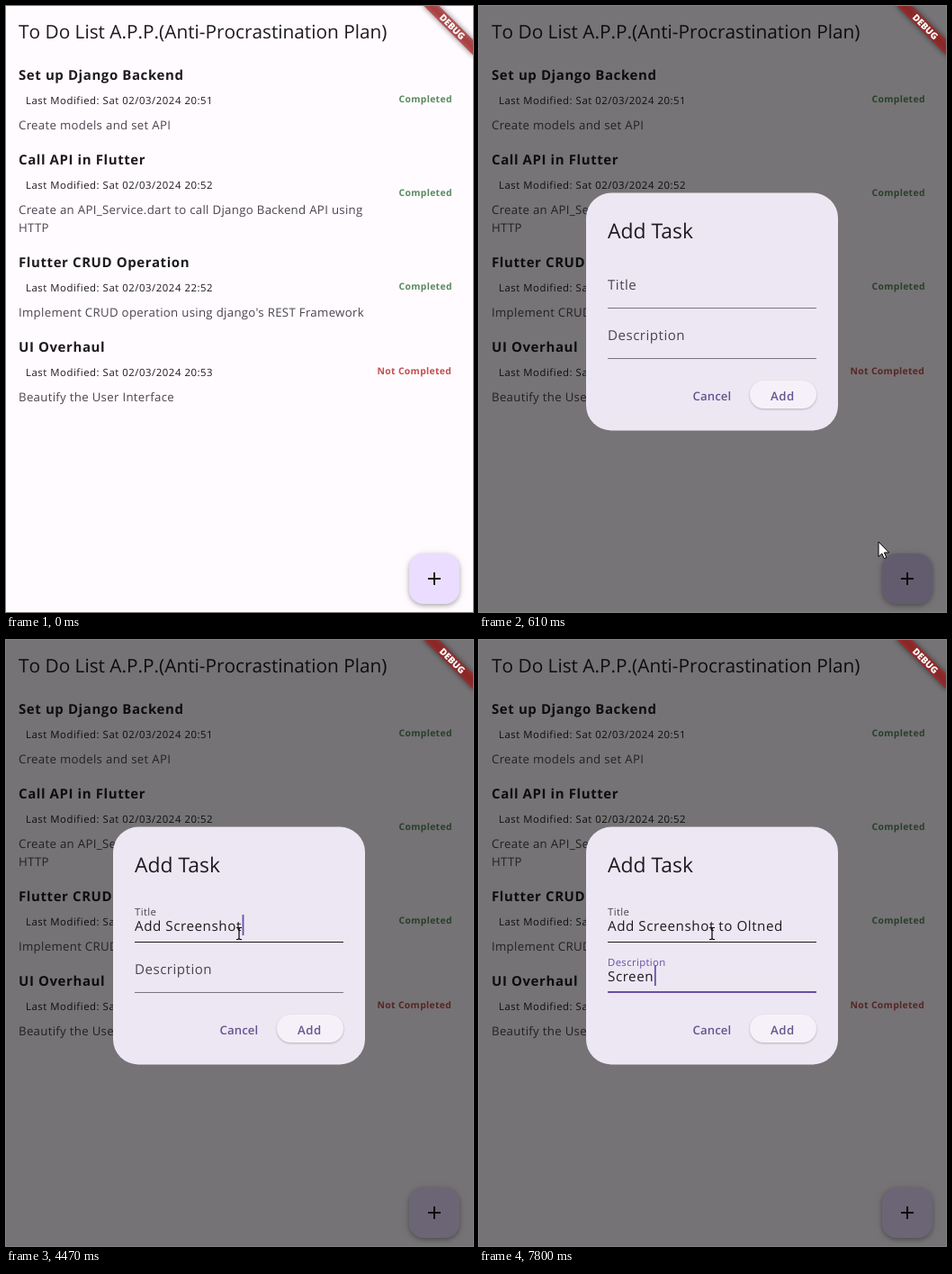
An HTML page for the animation above (8000 ms loop, 519 by 673 pixels).

```html
<!DOCTYPE html>
<html lang="en">
<head>
<meta charset="utf-8">
<title>To Do List</title>
<style>
  html, body { margin: 0; width: 100%; height: 100%; overflow: hidden; background: #fffbff; }
  svg { display: block; width: 519px; height: 673px; }
  text {
    font-family: "Open Sans", "Noto Sans", sans-serif;
    fill: #1d1b20;
    text-rendering: geometricPrecision;
    white-space: pre;
  }
  .head { font-size: 20.8px; font-kerning: none; }
  .name { font-size: 15px; font-weight: 700; letter-spacing: .59px; }
  .date { font-size: 11.34px; letter-spacing: .55px; }
  .body { font-size: 13.23px; letter-spacing: .31px; fill: #49454f; }
  .state { font-size: 10.4px; font-weight: 700; letter-spacing: .33px; fill: #588a5c; }
  .state.open { fill: #c0504f; }
  .dialog-title { font-size: 22.9px; }
  .label { font-size: 15.1px; letter-spacing: .5px; fill: #49454f; }
  .input { font-size: 15.2px; letter-spacing: .55px; }
  .button { font-size: 13.2px; font-weight: 600; letter-spacing: .1px; fill: #65558f; }
  .debug { font-size: 10.2px; font-weight: 800; fill: #fff; text-anchor: middle; }
  .fab { filter: drop-shadow(0 2px 2.5px rgba(0, 0, 0, .26)) drop-shadow(0 1px 4px rgba(0, 0, 0, .1)); }
  .pill { filter: drop-shadow(0 1px 1px rgba(0, 0, 0, .24)); }
  .soft { filter: blur(3px); }
</style>
</head>
<body>
<svg viewBox="0 0 519 673">
  <rect width="519" height="673" fill="#fffbff"/>
  <text class="head" x="14" y="36">To Do List A.P.P.(Anti-Procrastination Plan)</text>
  <g id="list"></g>

  <rect class="fab" x="448" y="608" width="56" height="56" rx="16" fill="#eaddff"/>
  <rect id="press" x="448" y="608" width="56" height="56" rx="16" fill="#21005d"/>
  <path d="M469 636h14M476 629v14" stroke="#1d1623" stroke-width="2"/>

  <rect id="barrier" width="519" height="673"/>

  <g id="dialog">
    <rect x="119" y="207.5" width="280" height="264" rx="28" fill="#ede7f3"/>
    <text class="dialog-title" x="143" y="258">Add Task</text>
    <g id="fields"></g>
    <text class="button" x="237.5" y="438">Cancel</text>
    <rect class="pill" x="301" y="416" width="74" height="31" rx="15.5" fill="#f6f1f9"/>
    <text class="button" x="324" y="438" style="letter-spacing:.5px">Add</text>
  </g>

  <g transform="translate(520 -1) rotate(45)">
    <rect class="soft" x="-40" y="28" width="80" height="12" fill="#000" opacity=".5"/>
    <rect x="-40" y="28" width="80" height="12" fill="#b71c1c" opacity=".627"/>
    <text class="debug" x="0" y="37.7">DEBUG</text>
  </g>

  <path id="arrow" d="M0 0V16.5L3.8 13L6.2 18.6L8.8 17.5L6.4 12H11.6Z" fill="#fff" stroke="#000"/>
  <path id="beam" d="M-3 -6.5H-1L0 -5.5L1 -6.5H3M0 -5.5V5.5M-3 6.5H-1L0 5.5L1 6.5H3" fill="none" stroke="#000" stroke-width="1.2"/>
</svg>
<script>
const LOOP = 8000;
const $ = id => document.getElementById(id);
const clamp = v => Math.max(0, Math.min(1, v));
const smooth = p => p * p * (3 - 2 * p);
const easeOut = (p, power) => 1 - (1 - p) ** power;
const mix = (a, b, p) => a + (b - a) * p;

function add(parent, tag, attrs, text = '') {
  const el = document.createElementNS('http://www.w3.org/2000/svg', tag);
  for (const key in attrs) el.setAttribute(key, attrs[key]);
  el.textContent = text;
  return parent.appendChild(el);
}

// Task list
const tasks = [
  [0, 'Set up Django Backend', '20:51', ['Create models and set API'], 107],
  [94, 'Call API in Flutter', '20:52',
    ['Create an API_Service.dart to call Django Backend API using', 'HTTP'], 211],
  [208, 'Flutter CRUD Operation', '22:52',
    ["Implement CRUD operation using django's REST Framework"], 315],
  [302, 'UI Overhaul', '20:53', ['Beautify the User Interface'], 409, true]
];
for (const [y, name, time, lines, stateY, open] of tasks) {
  const put = (cls, x, top, text) => add($('list'), 'text', { class: cls, x, y: top }, text);
  put('name', 14, y + 82, name);
  put('date', 22, y + 109, 'Last Modified: Sat 02/03/2024 ' + time);
  lines.forEach((line, i) => put('body', 14, y + 137 + 20 * i, line));
  put(open ? 'state open' : 'state', open ? 412.5 : 436.5, stateY, open ? 'Not Completed' : 'Completed');
}

// Text fields
function makeField(name, y) {
  const box = $('fields');
  return {
    y,
    label: add(box, 'text', { class: 'label' }, name),
    input: add(box, 'text', { class: 'input', x: 143, y: y - 13 }),
    line: add(box, 'rect', { x: 143, width: 232 }),
    caret: add(box, 'rect', { y: y - 31, width: 1.8, height: 23, fill: '#6750a4' })
  };
}
const titleField = makeField('Title', 336);
const noteField = makeField('Description', 392);

// '<' deletes the last letter
const titleKeys = [
  [1310, 'A'], [1510, 'd'], [1710, 'd'], [1780, ' '], [1970, 'S'], [2170, 'c'],
  [2430, 're'], [2760, 'n'], [3560, '<'], [3690, 'e'], [3820, 'n'], [3950, 's'],
  [4210, 'ho'], [4470, 't'], [4570, ' '], [4670, 't'], [4770, 'o'], [4870, ' '],
  [5070, 'O'], [5270, 'l'], [5400, 't'], [5530, 'n'], [5730, 'e'], [5930, 'd']
];
const noteKeys = [[7070, 'S'], [7270, 'c'], [7460, 'r'], [7530, 'e'], [7730, 'e'], [7800, 'n']];

const typed = (keys, t) => keys.reduce((text, [at, key]) =>
  at > t ? text : key === '<' ? text.slice(0, -1) : text + key, '');

function drawField(f, lift, text, caretOn, lineColor, lineHeight, labelColor) {
  const p = smooth(lift);
  f.label.setAttribute('transform',
    `translate(143 ${mix(f.y - 21, f.y - 30, p)}) scale(${mix(1, .75, p)})`);
  f.label.style.fill = labelColor;
  if (f.input.textContent !== text) f.input.textContent = text;
  f.line.setAttribute('y', f.y - lineHeight);
  f.line.setAttribute('height', lineHeight);
  f.line.setAttribute('fill', lineColor);
  f.caret.setAttribute('opacity', caretOn ? 1 : 0);
  if (caretOn) f.caret.setAttribute('x', 143 + (text ? f.input.getComputedTextLength() + .8 : 0));
}

// Pointer stops: time, x, y
const stops = [
  [70, 497, 662], [140, 487, 640], [210, 480, 629], [280, 478, 627],
  [610, 444, 595], [680, 385, 520], [750, 318, 432], [820, 266, 362],
  [890, 260, 331], [960, 259, 326]
];

// The screen refreshes in short ticks
const ticks = [0, 70, 140, 210, 280, 340, 410, 480, 550, 610, 680, 750, 820,
  890, 960, 1030, 1100, 1170, 1240, 1310, 6070, 6140, 6210];
const hold = t => ticks.filter(k => k <= t).pop();

function pressAlpha(t) {
  if (t < 140) return 0;
  if (t < 340) return .08;
  if (t < 550) return .16;
  return .1 * clamp((820 - t) / 200);
}

function drawPointer(t) {
  const stop = stops.filter(s => s[0] <= t).pop();
  const overField = t >= 820;
  $('arrow').setAttribute('opacity', stop && !overField ? 1 : 0);
  $('beam').setAttribute('opacity', overField ? 1 : 0);
  if (stop) $(overField ? 'beam' : 'arrow').setAttribute('transform', `translate(${stop[1]} ${stop[2]})`);
}

function draw(t) {
  const h = hold(t);
  const shown = clamp((h - 475) / 150);
  $('barrier').setAttribute('opacity', .54 * easeOut(shown, 2.4));
  // The card is fully opaque slightly before the barrier settles
  $('dialog').setAttribute('opacity', easeOut(clamp(shown / .9), 1.45));
  $('press').setAttribute('opacity', pressAlpha(h));
  drawPointer(h);

  const dark = '#1d1b20', grey = '#79747e', muted = '#49454f';
  const titleCaret = h >= 1100 && t < 6070 && !(t >= 3230 && t < 3560);
  drawField(titleField, clamp((h - 1060) / 167), typed(titleKeys, t), titleCaret,
    h >= 890 ? dark : grey, 1, muted);

  const focus = clamp((h - 6040) / 167);
  const noteCaret = t >= 6070 && !(t >= 6540 && t < 7070);
  const tint = `rgb(${mix(73, 103, focus)} ${mix(69, 80, focus)} ${mix(79, 164, focus)})`;
  drawField(noteField, focus, typed(noteKeys, t), noteCaret,
    focus ? tint : h === 820 ? dark : grey, 1 + focus, tint);
}

function loop() {
  draw(performance.now() % LOOP);
  requestAnimationFrame(loop);
}
loop();
</script>
</body>
</html>
```
